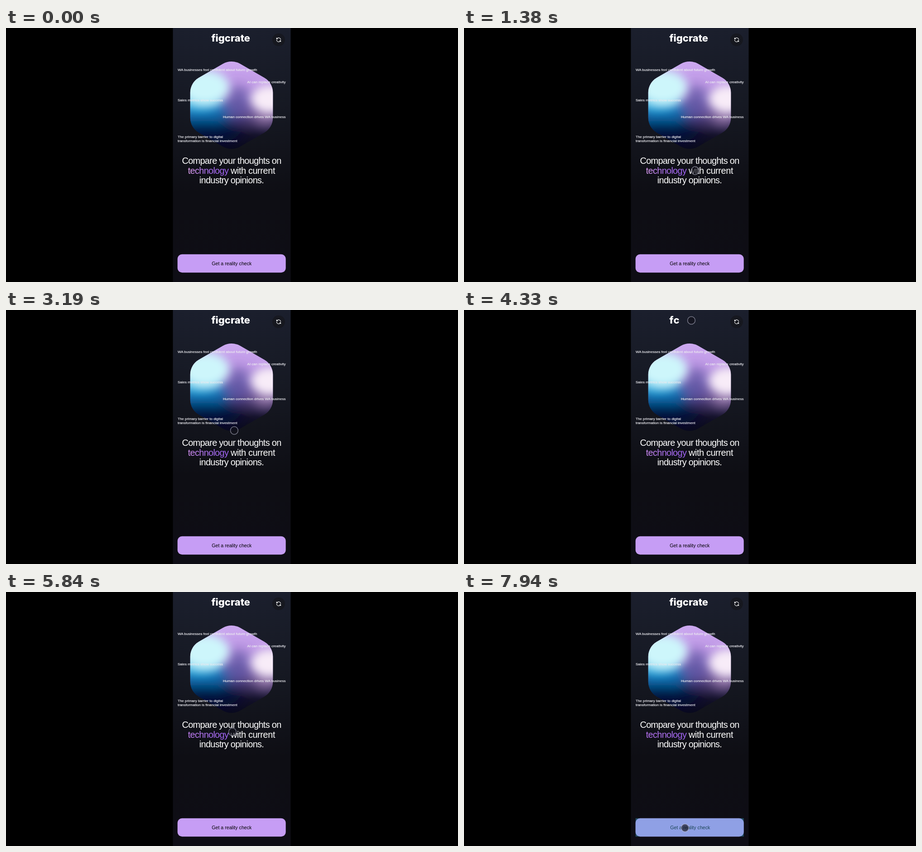
Animation, 998 px wide and 561 px high, one loop 8000 ms. Source, as an HTML page:

```html
<!DOCTYPE html>
<html lang="en">
<head>
<meta charset="utf-8">
<title>Reality check</title>
<style>
  html, body { margin: 0; width: 100%; height: 100%; overflow: hidden; background: #000; }
  svg { display: block; width: 100%; height: 100%; }
  text { font-family: "Liberation Sans", Arial, sans-serif; }
  .logo text { font: 800 22px Inter, sans-serif; fill: #fff; }
  .claims { font-size: 8px; fill: #eaeaef; stroke: #eaeaef; stroke-width: .2; }
  .title { font-size: 20px; letter-spacing: -.74px; fill: #fff; }
  .right { text-anchor: end; }
  .middle { text-anchor: middle; }
</style>
</head>
<body>
<svg viewBox="0 0 998 561">
  <defs>
    <linearGradient id="panel" x2="0" y2="1">
      <stop stop-color="#1b1f2d"/>
      <stop offset=".3" stop-color="#161923"/>
      <stop offset=".65" stop-color="#0e0e14"/>
      <stop offset="1" stop-color="#0e0d15"/>
    </linearGradient>
    <linearGradient id="body" gradientUnits="userSpaceOnUse" x1="498" y1="74" x2="498" y2="267">
      <stop stop-color="#cca8f0"/>
      <stop offset=".26" stop-color="#c09ae6"/>
      <stop offset=".42" stop-color="#9a7fcb"/>
      <stop offset=".56" stop-color="#65529c"/>
      <stop offset=".7" stop-color="#33285a"/>
      <stop offset=".84" stop-color="#121029"/>
      <stop offset="1" stop-color="#090a1b"/>
    </linearGradient>
    <linearGradient id="accent" gradientUnits="userSpaceOnUse" x1="400" y1="0" x2="493" y2="0">
      <stop id="accentStart"/>
      <stop offset=".45" stop-color="#ac70ee"/>
      <stop offset="1" stop-color="#9c60f2"/>
    </linearGradient>
    <filter id="blur" x="-100%" y="-100%" width="300%" height="300%"><feGaussianBlur stdDeviation="10"/></filter>
    <filter id="haze" x="-100%" y="-100%" width="300%" height="300%"><feGaussianBlur stdDeviation="15"/></filter>
    <clipPath id="hex">
      <path d="M479 79.1A38 38 0 0 1 517 79.1L570.3 109.8A38 38 0 0 1 589.3 142.8V198.2A38 38 0 0 1 570.3 231.2L517 261.9A38 38 0 0 1 479 261.9L425.8 231.2A38 38 0 0 1 406.8 198.2V142.8A38 38 0 0 1 425.8 109.8Z"/>
    </clipPath>
  </defs>

  <rect width="998" height="561"/>
  <rect x="368.5" width="260" height="561" fill="url(#panel)"/>

  <g class="logo">
    <text id="first" y="30">f</text>
    <text id="inner" y="30">ig</text>
    <text id="second" y="30">c</text>
    <text id="tail" y="30">rate</text>
  </g>

  <circle cx="602" cy="26" r="14" fill="#15161b" opacity=".7"/>
  <path transform="translate(596 20) scale(.5)" fill="none" stroke="#fff" stroke-width="2.5"
    d="M21 12a9 9 0 0 0-9-9 9.8 9.8 0 0 0-6.7 2.7L3 8M3 3v5h5M3 12a9 9 0 0 0 9 9 9.8 9.8 0 0 0 6.7-2.7L21 16M16 16h5v5"/>

  <g clip-path="url(#hex)">
    <rect x="400" y="70" width="196" height="200" fill="url(#body)"/>
    <g filter="url(#haze)">
      <ellipse cx="512" cy="166" rx="18" ry="40" fill="#5a539f" opacity=".85"/>
      <ellipse cx="436" cy="188" rx="56" ry="24" fill="#0f70b4"/>
      <ellipse cx="440" cy="230" rx="78" ry="25" fill="#06103a"/>
      <ellipse cx="574" cy="195" rx="32" ry="18" fill="#b893c0" opacity=".8"/>
    </g>
    <g filter="url(#blur)">
      <ellipse cx="428" cy="163" rx="50" ry="21" fill="#34bfe8"/>
      <ellipse cx="440" cy="131" rx="53" ry="38" fill="#cdf6fb"/>
      <ellipse cx="582" cy="157" rx="41" ry="31" fill="#f8ecf8"/>
    </g>
  </g>

  <g class="claims">
    <text x="379" y="95">WA businesses feel confident about future growth</text>
    <text x="617.5" y="121.5" class="right">AI can replace creativity</text>
    <text x="379" y="161.7">Sales metrics show success</text>
    <text x="617.5" y="198.7" class="right">Human connection drives WA business</text>
    <text x="379" y="243">The primary barrier to digital</text>
    <text x="379" y="252.3">transformation is financial investment</text>
  </g>

  <g class="title">
    <text x="498" y="300.3" class="middle">Compare your thoughts on</text>
    <text x="401.8" y="321.5" fill="url(#accent)">technology</text>
    <text x="594" y="321.5" class="right" style="letter-spacing:-.45px">with current</text>
    <text x="498" y="342.7" class="middle">industry opinions.</text>
  </g>

  <rect x="378.7" y="499.7" width="239" height="40.5" rx="10" fill="#c69df5"/>
  <text id="label" x="498.3" y="523.6" class="middle" font-size="10.67">Get a reality check</text>
  <rect id="tap" x="378.7" y="499.7" width="239" height="40.5" fill="rgb(60,165,205)" fill-opacity=".4"/>

  <ellipse id="cursor" fill="#12121c" fill-opacity=".65" stroke="#c9c9dc" stroke-opacity=".55" stroke-width="1.5"/>
</svg>

<script>
const LOOP = 8000;
const APPEAR = 480;
const TAP = 7880;
const LOGO_X = 453.5;

// time, x, y
const path = [
  [480, 517, 110], [900, 513, 184], [1500, 510, 330], [1680, 510, 330],
  [1990, 506, 417], [2230, 506, 417], [3100, 504, 270], [4330, 502, 23],
  [4690, 502, 23], [5840, 500, 309], [7160, 494, 426], [7640, 488, 521], [8000, 488, 521]
];

const $ = id => document.getElementById(id);
const mix = (a, b, k) => a + (b - a) * k;
const ramp = (t, from, to) => {
  const k = Math.min(1, Math.max(0, (t - from) / (to - from)));
  return k * k * (3 - 2 * k);
};

function cursorAt(t) {
  const i = Math.max(1, path.findIndex(point => point[0] >= t));
  const [a, b] = [path[i - 1], path[i]];
  const k = ramp(t, a[0], b[0]);
  return [mix(a[1], b[1], k), mix(a[2], b[2], k)];
}

function drawLogo(t) {
  const collapsed = ramp(t, 3950, 4280) - ramp(t, 4750, 5100);
  const firstEnd = LOGO_X + $('first').getComputedTextLength();
  const innerEnd = firstEnd + $('inner').getComputedTextLength();
  const secondX = mix(innerEnd, firstEnd, collapsed);
  $('first').setAttribute('x', LOGO_X);
  $('inner').setAttribute('x', firstEnd);
  $('second').setAttribute('x', secondX);
  $('tail').setAttribute('x', secondX + $('second').getComputedTextLength());
  for (const id of ['inner', 'tail']) $(id).setAttribute('opacity', Math.max(0, 1 - collapsed * 1.6));
}

function drawCursor(t) {
  const [x, y] = cursorAt(t);
  const speed = Math.abs(y - cursorAt(Math.max(APPEAR, t - 30))[1]);
  const cursor = $('cursor');
  cursor.setAttribute('cx', x);
  cursor.setAttribute('cy', y);
  cursor.setAttribute('rx', 8.4);
  cursor.setAttribute('ry', 8.4 + Math.min(.8, speed * .08));
  cursor.setAttribute('visibility', t < APPEAR ? 'hidden' : 'visible');
}

function draw(now) {
  const t = now % LOOP;
  const tapped = t >= TAP;
  const fade = t / LOOP;
  drawLogo(t);
  drawCursor(t);
  $('tap').setAttribute('visibility', tapped ? 'visible' : 'hidden');
  $('label').setAttribute('x', tapped ? 499.3 : 498.3);
  $('accentStart').setAttribute('stop-color', `rgb(${mix(228, 182, fade)},${mix(166, 112, fade)},240)`);
  requestAnimationFrame(draw);
}
requestAnimationFrame(draw);
</script>
</body>
</html>
```
